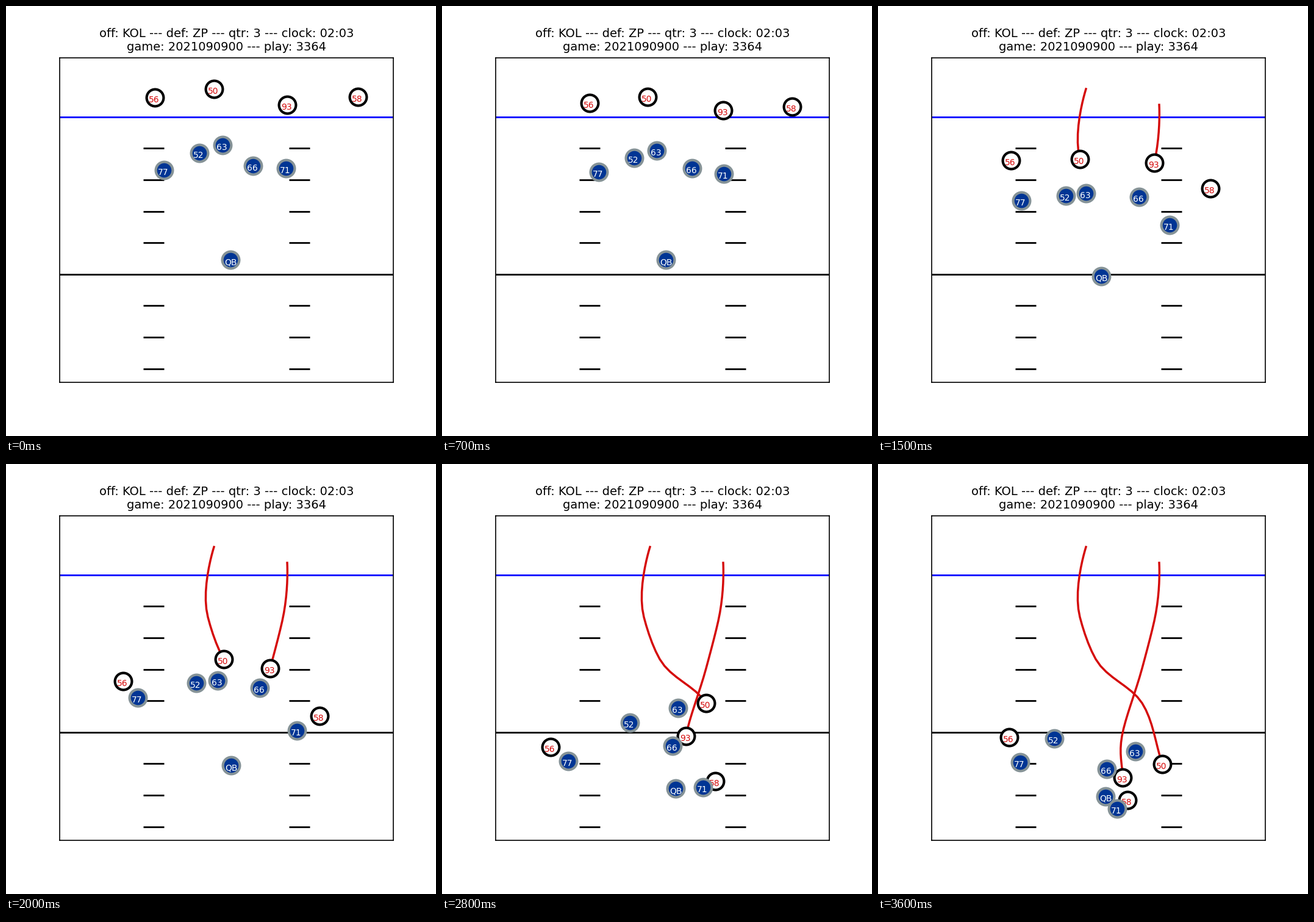
Write a matplotlib script that moves like this. It is 705 px wide and 705 px high and loops after 3.7 s.

```python
import numpy as np
import matplotlib.pyplot as plt
from matplotlib.animation import FuncAnimation

SIZE, DPI = 705, 100
FRAMES, STEP_MS = 37, 100
LEFT, RIGHT, TOP, BOTTOM = 88, 635, 85, 617
SCRIMMAGE, FIVE_YARDS = 181.85, 51.6

BLUE, SILVER, RED = "#003594", "#869397", "#d50a0a"
TIMES = np.array([4, 15, 20, 28, 36])  # snap, contact, push, turn, end


def glide(points):
    """Hold until the snap, then follow a smooth curve through the points."""
    p = np.array(points, float)
    slope = np.gradient(p, TIMES, axis=0)
    slope[0] = 0

    f = np.clip(np.arange(FRAMES), TIMES[0], TIMES[-1])
    i = np.clip(np.searchsorted(TIMES, f, side="right") - 1, 0, len(TIMES) - 2)
    h = (TIMES[i + 1] - TIMES[i])[:, None]
    u = (f - TIMES[i])[:, None] / h
    ease = u * u * (3 - 2 * u)
    return (p[i] + (p[i + 1] - p[i]) * ease
            + h * u * (1 - u) * ((1 - u) * slope[i] - u * slope[i + 1]))


fig = plt.figure(figsize=(SIZE / DPI, SIZE / DPI), dpi=DPI, facecolor="white")
ax = fig.add_axes([LEFT / SIZE, 1 - BOTTOM / SIZE,
                   (RIGHT - LEFT) / SIZE, (BOTTOM - TOP) / SIZE])
ax.set(xlim=(LEFT, RIGHT), ylim=(BOTTOM, TOP), xticks=[], yticks=[])
ax.spines[:].set_linewidth(1.2)
ax.set_title("off: KOL --- def: ZP --- qtr: 3 --- clock: 02:03\n"
             "game: 2021090900 --- play: 3364", fontsize=14, pad=8.5)

# Field markings
for n in range(9):
    y = SCRIMMAGE + n * FIVE_YARDS
    if n % 5 == 0:
        ax.axhline(y, color="black" if n else "blue", lw=2)
    else:
        ax.hlines([y, y], [225.3, 464.3], [259.3, 498.3], color="black", lw=2)


class Player:
    def __init__(self, label, *points, offense=True, trail=False):
        self.path = glide(points)
        face, edge, ink, z = ((BLUE, SILVER, "white", 5) if offense
                              else ("white", "black", RED, 3))
        self.trail, = ax.plot([], [], color=RED, lw=2.5, zorder=2.5, visible=trail)
        self.dot, = ax.plot([], [], "o", ms=20, mew=3, mfc=face, mec=edge, zorder=z)
        self.text = ax.text(0, 0, label, color=ink, fontsize=10, zorder=z + 1)

    def move(self, frame):
        x, y = self.path[frame]
        self.dot.set_data([x], [y])
        self.text.set_position((x - 10, y + 8))
        self.trail.set_data(*self.path[:frame + 1].T)
        return self.trail, self.dot, self.text


def rusher(label, *points, trail=False):
    return Player(label, *points, offense=False, trail=trail)


players = [
    rusher("56", (244, 150), (218, 253), (192, 356), (178, 464), (215, 448)),
    rusher("50", (341, 136), (331, 251), (357, 320), (433, 392), (466, 492), trail=True),
    rusher("93", (461, 162), (453, 257), (433, 335), (400, 446), (401, 514), trail=True),
    rusher("58", (577, 149), (545, 299), (514, 413), (448, 520), (409, 551)),
    Player("QB", (368, 416), (366, 443), (369, 494), (383, 532), (373, 545)),
    Player("77", (259, 269), (235, 319), (216, 383), (207, 487), (233, 489)),
    Player("52", (317, 241), (308, 311), (312, 359), (308, 424), (289, 450)),
    Player("63", (355, 228), (341, 307), (347, 355), (387, 400), (422, 471)),
    Player("66", (405, 262), (428, 313), (416, 367), (378, 462), (375, 500)),
    Player("71", (459, 266), (478, 359), (477, 437), (428, 530), (392, 565)),
]


def draw(frame):
    return [artist for player in players for artist in player.move(frame)]


anim = FuncAnimation(fig, draw, frames=FRAMES, interval=STEP_MS,
                     init_func=lambda: draw(0), repeat=True, repeat_delay=0)
plt.show()
```
